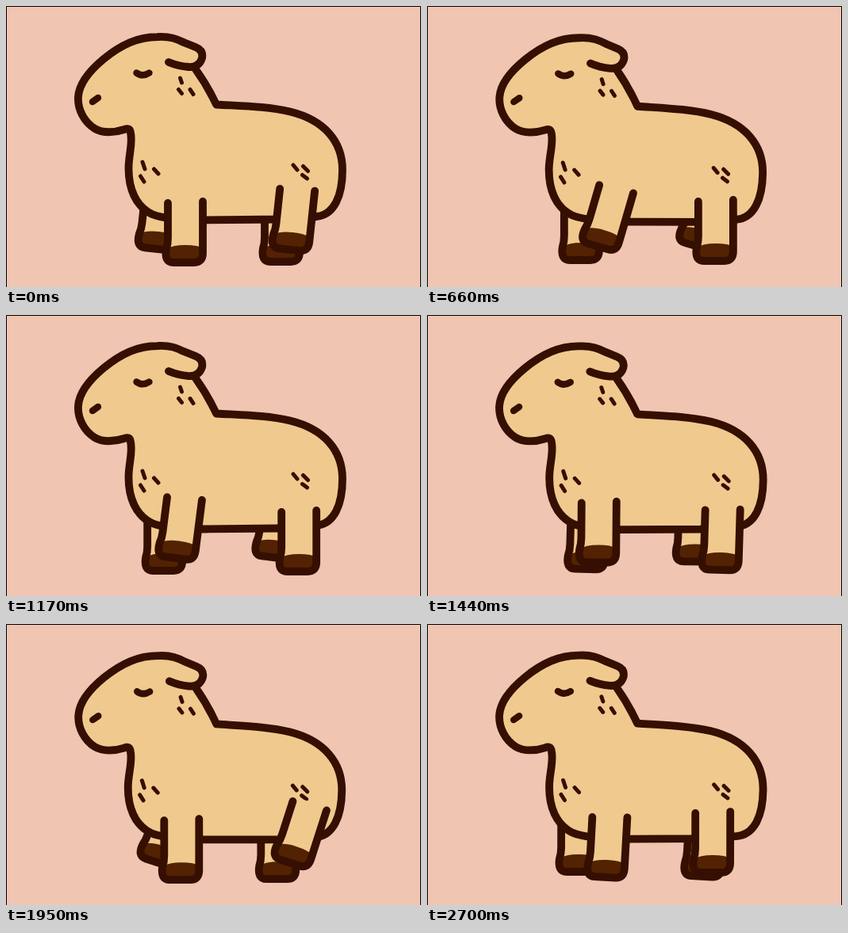
Animation, 523 px wide and 355 px high, one loop 2.73 s. Source, as an HTML page:

```html
<!DOCTYPE html>
<html lang="en">
<head>
<meta charset="utf-8">
<title>Walking capybara</title>
<style>
  html, body { margin: 0; width: 100%; height: 100%; overflow: hidden; background: #f0c5b2; }
  svg { display: block; width: 523px; height: 355px; }
  .line { fill: none; stroke: #350f01; stroke-width: 9.8; stroke-linecap: round; stroke-linejoin: round; }
  .skin { fill: #f0c98e; }
  .hoof { fill: #532202; }
  .face { stroke-width: 8.4; }
  .fur { stroke-width: 5; }
</style>
</head>
<body>
<svg viewBox="0 0 523 355">
  <defs>
    <g id="leg">
      <path class="skin" d="M0-6H44V64Q44 75 34 75H7Q-4 75-3 64L0 46Z"/>
      <path class="hoof" d="M-2 58Q6 53 22 53T44 57V64Q44 75 34 75H7Q-4 75-3 64Z"/>
      <path class="line" d="M0 0V44Q0 52-2 58-5 75 7 75H33Q44 75 44 63V-2"/>
    </g>
  </defs>
  <g id="far"></g>
  <g id="body">
    <path class="line" style="fill:#f0c98e" d="M239 80Q254 101 265 124.500C300 126.500 330 127 358 133.500
      C401 144 424 171 424 207C424 239 414 264 391 266L345 269.500 250 270.500C222 270.500 198 269 184 263
      C163 253 154.500 230 154.500 205C154.500 188 160 174 157 160Q156 153 149 156C137 160 122 161 112 155
      C99 147 90 131 91 115C92 98 105 82 123 67C145 49 166 39 191 39C207 38 216 42 224 46L239 52
      Q249 56 247 66 243 78 230 77 217 76 205 71"/>
    <path class="line face" d="M109 121L116 116M164.500 84.500Q172 90 180.500 84.500"/>
    <path class="line fur" d="M219.500 91L221.500 97M217.500 105.500L221.500 110.500M232 105.500L236 111.500
      M172 197L175 206M169.500 215L174 222M186.500 206L192 212
      M362 201L367 207M374.500 202.500L380.500 208.500M373.500 213.500L379.500 218"/>
  </g>
  <g id="near"></g>
  <path d="M.5 355V.5H522.500V355" fill="none" stroke="#000"/>
</svg>
<script>
const LOOP = 2730, STEP = 30, STRIDE = 2400, HALF = STRIDE / 2;

const body = document.getElementById('body');

function addLeg(layer, x, y, shift) {
  const el = document.createElementNS('http://www.w3.org/2000/svg', 'use');
  el.setAttribute('href', '#leg');
  document.getElementById(layer).append(el);
  return { el, x, y, shift };
}

const legs = [
  addLeg('far', 326, 248, 0),
  addLeg('far', 178.5, 248, HALF),
  addLeg('near', 347.5, 249, HALF),
  addLeg('near', 204, 249, 0)
];

// smooth step from 0 to 1 between two times
function ease(from, to, t) {
  const u = Math.min(1, Math.max(0, (t - from) / (to - from)));
  return u * u * (3 - 2 * u);
}

// the foot drifts back on the ground, then lifts, tilts and steps forward
function stride(t) {
  const swing = Math.sin(Math.PI * Math.min(1, t / 1590)) ** 3;
  const lift = ease(100, 800, t) * (1 - ease(700, 2100, t));
  return {
    dx: 25 * (t / STRIDE - ease(660, 1520, t)) + 7 * swing,
    dy: -25.5 * lift,
    tilt: 18 * swing
  };
}

function draw(t) {
  for (const { el, x, y, shift } of legs) {
    const { dx, dy, tilt } = stride((t + shift) % STRIDE);
    el.setAttribute('transform', `translate(${x + dx} ${y + dy}) rotate(${tilt})`);
  }
  const nod = 0.4 * (1 - Math.cos(2 * Math.PI * t / HALF));
  body.setAttribute('transform', `rotate(${nod} 100 145)`);
}

const start = performance.now();
function tick() {
  const t = (performance.now() - start) % LOOP;
  draw(Math.floor(t / STEP) * STEP);
  requestAnimationFrame(tick);
}
tick();
</script>
</body>
</html>
```
